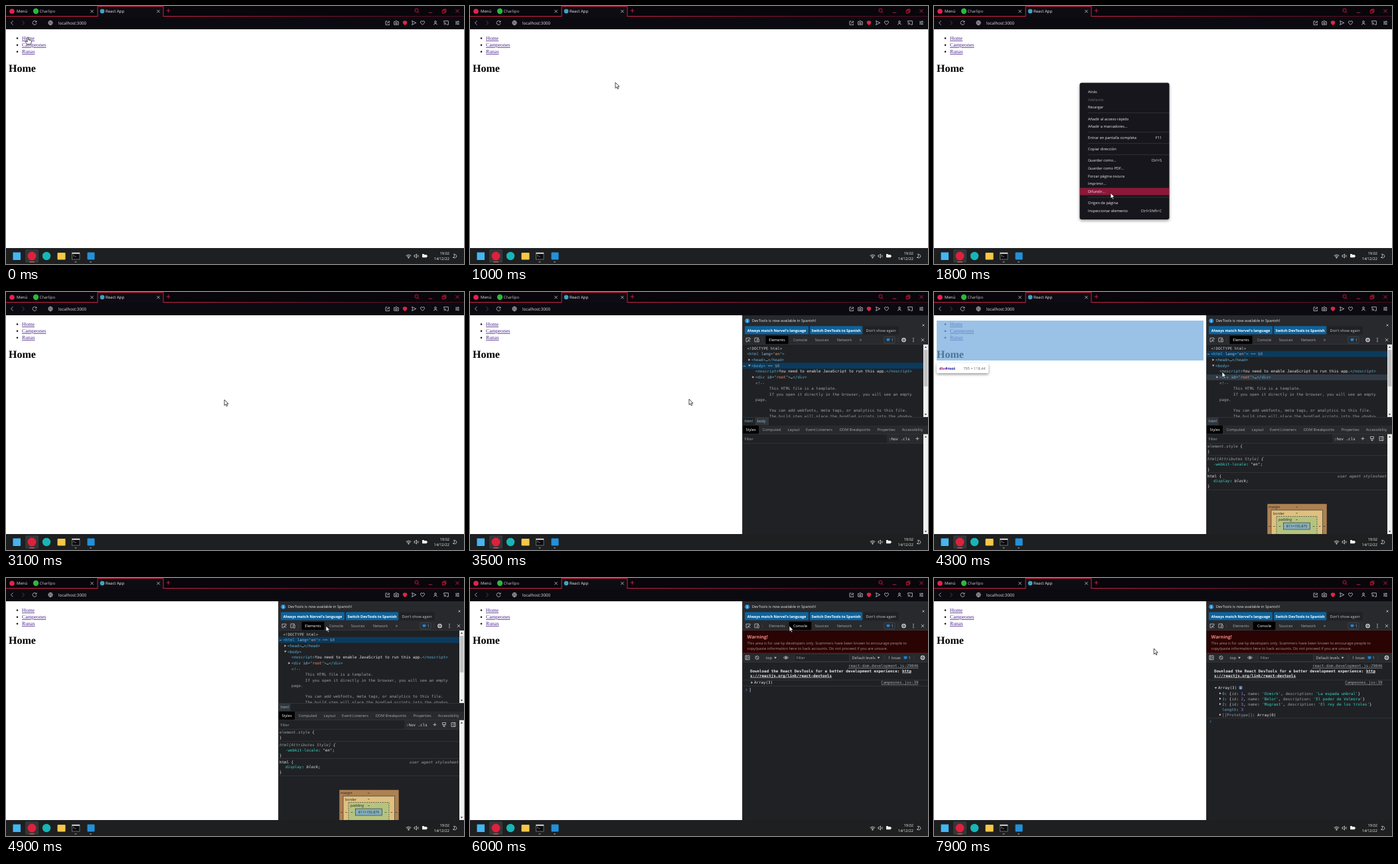
An HTML page that plays this animation: 690 px wide and 388 px high, repeating every 8 s.

```html
<!DOCTYPE html>
<html lang="es">
<head>
<meta charset="utf-8">
<title>React App</title>
<style>
  html, body { margin: 0; width: 100%; height: 100%; overflow: hidden; background: #fff; }
  svg { display: block; width: 690px; height: 388px; }
  text { white-space: pre; text-rendering: geometricPrecision; font-family: "Open Sans", "Noto Sans", sans-serif; }
  .mono { font-family: "DejaVu Sans Mono", "Liberation Mono", monospace; }
  .serif { font-family: "Liberation Serif", "Noto Serif", serif; }
  .b { font-weight: 700; }
  .i { font-style: italic; }
  .u { text-decoration: underline; }
</style>
</head>
<body>
<svg id="stage" viewBox="0 0 690 388"></svg>
<script>
const LOOP = 8000, STEP = 100;
const RED = '#e3244b', GREY = '#c9c9cf', DARK = '#202124', BAR = '#292a2d', LINE = '#3c3f42';
const INK = { w: '#e3e5e8', t: '#5db0d7', a: '#9bbbdc', v: '#f29766', g: '#9aa0a6', s: '#35d4c7', n: '#9980ff', p: '#c4c7ca' };

// Drawing helpers: each returns SVG markup.
const esc = s => s.replace(/&/g, '&amp;').replace(/</g, '&lt;');
const box = (x, y, w, h, fill, extra = '') => `<rect x="${x}" y="${y}" width="${w}" height="${h}" fill="${fill}" ${extra}/>`;
const dot = (x, y, r, fill) => `<circle cx="${x}" cy="${y}" r="${r}" fill="${fill}"/>`;
const text = (x, y, s, size = 5.65, fill = INK.w, cls = '', anchor = 'start') =>
  `<text x="${x}" y="${y}" font-size="${size}" fill="${fill}" class="${cls}" text-anchor="${anchor}">${esc(s)}</text>`;
const icon = (x, y, d, stroke = GREY, w = .8) =>
  `<path transform="translate(${x} ${y})" d="${d}" fill="none" stroke="${stroke}" stroke-width="${w}" stroke-linejoin="round"/>`;
const solid = (x, y, d, fill = GREY) => `<path transform="translate(${x} ${y})" d="${d}" fill="${fill}"/>`;
const group = (id, s) => `<g id="${id}">${s}</g>`;
const hline = (x, y, w, c = LINE) => box(x, y, w, .6, c);

// Monospaced line centred on y; "~k" switches to colour k.
function code(x, y, s, cls = '') {
  const parts = s.split(/~(\w)/);
  let spans = parts[0] ? `<tspan fill="${INK.w}">${esc(parts[0])}</tspan>` : '';
  for (let i = 1; i < parts.length; i += 2) spans += `<tspan fill="${INK[parts[i]]}">${esc(parts[i + 1])}</tspan>`;
  return `<text x="${x}" y="${y + 2}" font-size="5.85" class="mono ${cls}">${spans}</text>`;
}

const CROSS = 'M-2.2-2.2L2.2 2.2M2.2-2.2L-2.2 2.2';
const RIGHT = 'M-1-1.8L1.6 0L-1 1.8Z', DOWN = 'M-1.8-1H1.8L0 1.6Z', UP = 'M-1.8 1H1.8L0-1.6Z';
const RING = 'M-2.6 0a2.6 2.6 0 1 0 5.2 0a2.6 2.6 0 1 0-5.2 0';
const gear = (x, y) => icon(x, y, RING, GREY, 1.5) + dot(x, y, .9, GREY);

function chrome() {
  return box(0, 0, 690, 16, '#08060a') + box(0, 16, 690, 19, '#0c0a11')
    + box(0, 15, 138, .9, RED) + box(237, 15, 453, .9, 'url(#edge)')
    + box(138, .5, 99, 16, '#0e0c13') + icon(0, 0, 'M138 16V.5H237V16', RED, .9)
    + dot(9, 8, 3.8, RED) + text(16, 10.2, 'Menú', 6)
    + dot(45, 7.8, 4.2, '#2bb741') + text(50.5, 10.2, 'Charlipo', 6, '#c6c6cc') + icon(129.5, 8, CROSS)
    + dot(145, 7.8, 3.4, '#3fa3bd') + text(150, 10.2, 'React App', 6, '#f0f0f2') + icon(229.5, 8, CROSS)
    + icon(244.5, 7, 'M-2.8 0H2.8M0-2.8V2.8', RED)
    + icon(618.5, 6.5, RING + 'M2 2L4 4', RED) + icon(639.5, 10, 'M-2.8 0H2.8', RED)
    + icon(660, 7.5, 'M-2.8-1H1.4V3H-2.8ZM-1.2-1V-2.6H3V1.4H1.4', RED) + icon(680, 7.5, 'M-2.7-2.7L2.7 2.7M2.7-2.7L-2.7 2.7', RED)
    + icon(9, 25.3, 'M1.6-3L-1.6 0L1.6 3') + icon(26, 25.3, 'M-1.6-3L1.6 0L-1.6 3', '#55535c')
    + icon(43, 25.3, 'M2.6-1.6A3 3 0 1 0 3 .6M3-3.2V-1.2H1')
    + icon(67, 25.3, 'M-3.2 0a3.2 3.2 0 1 0 6.4 0a3.2 3.2 0 1 0-6.4 0M-3 0H3M0-3.2Q-3 0 0 3.2Q3 0 0-3.2')
    + text(79, 27.5, 'localhost:3000', 6.25, '#e6e6ea')
    + icon(575, 25.3, 'M-.5-2.5H-3V3H2.5V1M-1 1Q-1-1.5 3-1.5M1.3-3.2L3-1.5L1.3 0')
    + icon(588, 25.3, 'M-3.3-1.8H-1.5L-.8-3H.8L1.5-1.8H3.3V2.8H-3.3ZM-1.3.5a1.3 1.3 0 1 0 2.6 0a1.3 1.3 0 1 0-2.6 0')
    + solid(601, 25.3, 'M0-3.4L3.1-2.4V0Q3 2.4 0 3.6Q-3 2.4-3.1 0V-2.4Z', RED)
    + icon(614.5, 25.3, 'M-3-3L3.4 0L-3 3L-1.8 0Z')
    + icon(627.5, 25.3, 'M0 3L-2.8 0Q-3.8-2.4-1.6-2.8Q-.4-2.8 0-1.6Q.4-2.8 1.6-2.8Q3.8-2.4 2.8 0Z')
    + icon(647, 25.3, 'M-1.4-1.4a1.4 1.4 0 1 0 2.8 0a1.4 1.4 0 1 0-2.8 0M-2.4 3Q-2.2.8 0 .8T2.4 3')
    + icon(663, 25.3, 'M-3.4-1V-2.8H3.4V2.8H1M-3.4 2.8h.5M-3.4 1Q-1.7 1-1.6 2.8M-3.4-.6Q-.2-.6 0 2.8')
    + icon(680, 25.3, 'M-3-2H3M-3 0H3M-3 2H3M1-3V-1M-1.4-1V1M1 1V3', GREY, .7);
}

function page() {
  const links = ['Home', 'Campeones', 'Runas'].map((s, i) =>
    dot(17, 48.6 + i * 10.1, 1.25, '#111') + text(24, 51 + i * 10.1, s, 7.8, '#4b2489', 'serif u')).join('');
  return box(0, 35, 690, 329, '#fff') + links + text(4, 99, 'Home', 16, '#000', 'serif b');
}

function overlay() {
  return box(4, 43, 402, 60, '#6fa8dc', 'opacity=".7"')
    + box(4, 107, 78, 15, '#fff', 'rx="1.5" filter="url(#soft)"') + solid(14, 105.8, UP, '#fff')
    + text(8, 117, 'div', 5.6, '#881280', 'b') + text(16.8, 117, '#root', 5.6, '#1a1aa6', 'b')
    + text(77.5, 117, '795 × 118.44', 5.6, '#5f6368', '', 'end');
}

function taskbar() {
  const bars = [[35, 8, '#e2613c'], [103.5, 3, '#9a9a9a'], [126, 3, '#9a9a9a']];
  return box(0, 364, 690, 24, '#1d1f20') + box(10.5, 370.5, 11.5, 11.5, '#45b5f2')
    + box(29, 366, 20, 20, '#343638', 'rx="2"') + dot(39, 376, 6.4, '#e0203f') + dot(61, 376, 6.2, '#19b5b5')
    + box(77.5, 371, 12, 10.5, '#f7c748', 'rx="1"')
    + box(99.5, 371, 11.5, 10, '#0b0b0c', 'stroke="#8b8d8f" stroke-width=".7"') + box(99.5, 371, 11.5, 1.8, '#d5d7d9')
    + icon(102, 375.5, 'M-.8-1L.6 0L-.8 1M1.5 1.2H3.5', '#ddd', .6)
    + box(122.5, 370.5, 11, 11, '#2390d8', 'rx="1"')
    + bars.map(([x, w, c]) => box(x, 384.2, w, 1.4, c, 'rx=".7"')).join('')
    + icon(606.5, 378.5, 'M-3.8-3Q0-6 3.8-3M-2.4-1.4Q0-3.4 2.4-1.4', '#eee') + dot(606.5, 378.5, 1, '#eee')
    + icon(618.5, 376, 'M-3.5-1.2H-2L0-3V3L-2 1.2H-3.5ZM1.5-1.3Q2.3 0 1.5 1.3', '#eee', .7) + icon(618.5, 376, 'M2.7-2.2Q4.2 0 2.7 2.2', '#777', .7)
    + box(627, 374, 7, 4.2, '#eee', 'rx=".8"') + box(634.2, 375.2, .9, 1.8, '#eee') + solid(628, 375, 'M-1-2V1.5H0V3H1V1.5H2V-2Z', '#eee')
    + text(668, 374.3, '19:02', 5.7, '#f0f0f0', '', 'end') + text(668, 382.2, '14/12/22', 5.6, '#f0f0f0', '', 'end')
    + icon(676, 376, 'M-1.4-2.8Q3.2-2.6 2.8 1Q1.4 3.8-2.6 2.2Q1.2 1.2-1.4-2.8Z', '#eee', .7);
}

const ITEMS = [
  ['Atrás', 129], ['Adelante', 140.5], ['Recargar', 152], ['Añadir al acceso rápido', 169.5], ['Añadir a marcadores...', 181],
  ['Entrar en pantalla completa', 198, 'F11'], ['Copiar dirección', 215.3], ['Guardar como...', 232.3, 'Ctrl+S'],
  ['Guardar como PDF...', 244], ['Forzar página oscura', 255.7], ['Imprimir...', 267.3], ['Difundir...', 279],
  ['Origen de página', 296], ['Inspeccionar elemento', 307.7, 'Ctrl+Shift+C']
];

function menu() {
  return box(219.5, 115.5, 135, 205.5, '#15121d', 'rx="3" filter="url(#soft)"')
    + box(220, 0, 134, 11, '#8c1739', 'id="hot"')
    + [160.5, 189.5, 206.5, 223.5, 287.5].map(y => hline(232, y, 122, '#44414c')).join('')
    + ITEMS.map(([s, y, key]) => text(232, y + 2, s, 5.65, s === 'Adelante' ? '#6c6a72' : '#ececf0')
      + (key ? text(343, y + 2, key, 5.65, '#ececf0', '', 'end') : '')).join('');
}

const tab = (x, y, s, on, w) => (on ? box(x - w / 2, y - 6.2, w, 12.4, '#000') : '')
  + text(x, y + 2, s, 5.65, on ? '#fff' : '#a4a9ae', '', 'middle');
const badge = (x, y) => box(x - 2.4, y - 2.3, 4.8, 3.8, '#1a86d8', 'rx=".6"') + solid(x - 1, y + 1.5, 'M0 0H2L0 1.3Z', '#1a86d8');

function scrollbar(y, h, thumb) {
  return box(683, y, 7, h, '#f1f1f1') + solid(686.5, y + 4, UP, '#505050') + solid(686.5, y + h - 4, DOWN, '#505050')
    + (thumb ? box(683.8, y + 8, 5.4, thumb, '#c1c1c1') : '');
}

function devtools() {
  return box(410, 35, 280, 329, DARK) + box(410, 35, 280, 31, '#28292c') + box(410, 35, .7, 329, '#4a4c50')
    + dot(417.7, 43.3, 3.4, '#2b8fd9') + box(417.3, 42.7, .9, 2.6, '#fff') + box(417.3, 41.3, .9, .9, '#fff')
    + text(424.7, 45.3, 'DevTools is now available in Spanish!')
    + box(414, 51.3, 96, 12.2, '#0e639c', 'rx="1"') + text(462, 59.5, "Always match Norvel's language", 5.5, '#fff', 'b', 'middle')
    + box(512, 51.3, 79, 12.2, '#0e639c', 'rx="1"') + text(551.5, 59.5, 'Switch DevTools to Spanish', 5.5, '#fff', 'b', 'middle')
    + box(593, 51.3, 52.5, 12.2, '#202124', 'rx="1"') + text(619, 59.5, "Don't show again", 5.65, '#c4c7ca', '', 'middle')
    + icon(683, 50, 'M-1.5-1.5L1.5 1.5M1.5-1.5L-1.5 1.5')
    + box(410.7, 66, 279.3, 12.8, BAR) + hline(410.7, 78.4, 279.3)
    + icon(419, 72, 'M-.5 2.8H-3V-2.8H3V-.5M0 0L3.2 3.2M0 0V2.6M0 0H2.6') + icon(432, 72, 'M-3 2.8V-3H2.5V-1.5M-3 2.8H-.5M.5-1H3.2V3H.5Z')
    + icon(440.5, 72, 'M0-3.6V3.6', LINE)
    + tab(530, 72, 'Sources') + tab(564, 72, 'Network') + text(588.5, 74.2, '»', 7, '#a4a9ae', '', 'middle')
    + box(624, 67.4, 16, 9.4, 'none', 'rx="1.2" stroke="#55585c" stroke-width=".6"') + badge(630, 72) + text(634.5, 74, '1', 5.5, '#9fc9ee')
    + icon(645, 72, 'M0-3.6V3.6', LINE)
    + gear(653.5, 72) + [-2.5, 0, 2.5].map(d => dot(668, 72 + d, .8, GREY)).join('') + icon(682, 72, CROSS);
}

function elements() {
  const html = '~t<html ~alang~t="~ven~t">', body = '~t<body>', eq = '~g == $0';
  const row = (y, s) => box(411, y - 4.5, 272, 9, '#0b3a5c') + code(411.5, y - .8, '…') + s;
  const comment = [[145.3, 'This HTML file is a template.'], [154, 'If you open it directly in the browser, you will see an empty'],
    [178.3, 'You can add webfonts, meta tags, or analytics to this file.'], [187, 'The build step will place the bundled scripts into the <body>']];
  const tabs = [['Styles', 423], ['Computed', 454.5], ['Layout', 487.5], ['Event Listeners', 526], ['DOM Breakpoints', 580], ['Properties', 627], ['Accessibility', 666.5]];
  return tab(462.5, 72, 'Elements', true, 34) + tab(497.5, 72, 'Console')
    + code(417.5, 84.5, '~p<!DOCTYPE html>')
    + group('rowA', code(417.5, 93.2, html) + row(110.8, code(424, 110.8, body + eq)))
    + group('rowB', row(93.2, code(417.5, 93.2, html + eq)) + code(424, 110.8, body))
    + solid(420.5, 102, RIGHT) + code(424, 102, '~t<head>~w…~t</head>') + solid(420.8, 110.5, DOWN)
    + code(430, 119.4, '~t<noscript>~wYou need to enable JavaScript to run this app.~t</noscript>')
    + box(411, 124, 272, 8.6, '#5a7796', 'id="hover" opacity=".3"')
    + solid(426.5, 128, RIGHT) + code(430, 128.2, '~t<div ~aid~t="~vroot~t">~w…~t</div>')
    + code(430, 137, '~g<!--') + comment.map(([y, s]) => code(451, y, '~g' + s)).join('') + code(430, 162, '~gpage.')
    + scrollbar(79, 109, 55)
    + box(410.7, 188, 279.3, 13, DARK) + hline(410.7, 188, 279.3)
    + group('pathA', box(429.5, 189, 20.5, 11, '#33363a') + text(414, 196.3, 'html', 5.5, '#8fc7e6') + text(432.5, 196.3, 'body', 5.5, '#8fc7e6'))
    + group('pathB', box(411, 189, 17.5, 11, '#33363a') + text(414, 196.3, 'html', 5.5, '#8fc7e6'))
    + box(410.7, 200.8, 279.3, 12.6, BAR) + tabs.map(([s, x], i) => tab(x, 207.2, s, !i, 24)).join('')
    + hline(410.7, 213.4, 279.3) + text(413.5, 222.7, 'Filter', 5.65, '#9aa0a6') + hline(410.7, 227, 272.3)
    + group('toolsA', box(628, 214, 55, 13, BAR) + code(631, 220.5, ':hov .cls') + icon(674, 220.5, 'M-2.5 0H2.5M0-2.5V2.5'))
    + group('styles', styles())
    + scrollbar(213.8, 150.2);
}

function styles() {
  const cell = (x, y, w, h, fill, dash) => box(x, y, w, h, fill, `stroke="#222" stroke-width=".6" ${dash ? 'stroke-dasharray="2 1.4"' : ''}`);
  const dashes = [[546.5, 323], [546.5, 332.5], [546.5, 342], [505.5, 352], [512.5, 352], [521, 352], [572, 352], [581, 352], [588, 352]];
  return box(600, 214, 83, 13, BAR) + code(603, 220.5, ':hov .cls') + icon(646, 220.5, 'M-2.5 0H2.5M0-2.5V2.5')
    + icon(660, 220.5, 'M-2.5-3H2.5V0H-2.5ZM-1 0V3H1V0') + icon(674, 220.5, 'M-3-3H3V3H-3ZM1-3V3M-1-1L-2 0L-1 1')
    + code(412, 232, '~gelement.style ~w{') + code(412, 240.3, '}') + hline(411, 245.5, 272)
    + code(412, 250.8, '~ghtml[Attributes Style] ~w{', 'i') + code(421, 258.8, '~s-webkit-locale~w: "en";') + code(412, 266.5, '}') + hline(411, 271, 272)
    + code(412, 276.5, 'html {') + text(682, 278.5, 'user agent stylesheet', 5.85, INK.g, 'mono i', 'end')
    + code(421, 284.3, '~sdisplay~w: block;', 'i') + code(412, 292, '}') + hline(411, 297, 272)
    + cell(502, 318.3, 90, 70, '#ae8152') + cell(508, 328, 77.5, 52, '#e0c080') + cell(516, 337.5, 61, 34, '#b5c380', true)
    + cell(526.5, 347, 40, 10, '#86b0bd')
    + text(504, 325.2, 'margin', 5.3, '#222') + text(511, 334.7, 'border', 5.3, '#222') + text(519, 344.2, 'padding', 5.3, '#222')
    + text(546.5, 354, '811×155.875', 5.3, '#222', '', 'middle')
    + dashes.map(([x, y]) => box(x - 1.3, y, 2.6, .6, '#222')).join('');
}

function consoleView() {
  const entry = (i, name, desc) => solid(431, 173.5 + i * 8, RIGHT)
    + code(434.3, 173.5 + i * 8, `~t${i}~w: {~gid~w: ~n${i + 1}~w, ~gname~w: ~s'${name}'~w, ~gdescription~w: ~s'${desc}'~w}`);
  const link = (y, s) => text(675.5, y + 2, s, 5.85, '#a4a9ae', 'mono u', 'end');
  return box(410.7, 79, 279.3, 285, DARK) + tab(462.5, 72, 'Elements') + tab(497.5, 72, 'Console', true, 33.5)
    + box(410.7, 79, 279.3, 33.5, '#2a0303') + hline(410.7, 112.3, 279.3, '#5c1010')
    + text(417.5, 90.8, 'Warning!', 7, '#f08a84', 'b')
    + text(417.5, 99.7, 'This area is for use by developers only. Scammers have been known to encourage people to', 5.65, '#a89492')
    + text(417.5, 107.6, 'copy/paste information here to hack accounts. Do not proceed if you are unsure.', 5.65, '#a89492')
    + box(410.7, 113, 279.3, 13.4, BAR) + hline(410.7, 126.2, 279.3)
    + icon(418, 119.8, 'M-3-3H3V3H-3ZM-1-3V3M.5-1.4L2 0L.5 1.4') + icon(432.5, 119.8, RING + 'M-1.8-1.8L1.8 1.8')
    + text(446, 121.8, 'top', 5.65, INK.p) + solid(460, 119.8, DOWN)
    + icon(476, 119.8, 'M-3.6 0Q0-4 3.6 0Q0 4-3.6 0Z') + dot(476, 119.8, 1.3, GREY)
    + box(489, 114.3, 82.5, 10.8, DARK, `stroke="${LINE}" stroke-width=".5"`) + text(491.5, 121.8, 'Filter', 5.65, '#9aa0a6')
    + text(575.5, 121.8, 'Default levels', 5.65, INK.p) + solid(615.5, 119.8, DOWN)
    + icon(624, 119.8, 'M0-4V4M45 -4V4', LINE) + text(630, 121.8, '1 Issue:', 5.65, INK.p) + badge(656, 120) + text(660.5, 121.8, '1', 5.5, '#9fc9ee') + gear(682, 119.8)
    + link(132.2, 'react-dom.development.js:29846')
    + code(422, 139.6, 'Download the React DevTools for a better development experience: ', 'b')
    + text(651, 141.6, 'http', 5.85, INK.w, 'mono b u') + text(422, 148.6, 's://reactjs.org/link/react-devtools', 5.85, INK.w, 'mono b u')
    + hline(411, 153, 279) + link(157.2, 'Campeones.jsx:39')
    + group('closed', solid(424.5, 157.3, RIGHT) + code(428, 157.3, 'Array(3)') + hline(411, 162.3, 279)
      + icon(416.5, 168.3, 'M-1-1.7L1 0L-1 1.7', '#3b8eea') + box(421.8, 165.2, .6, 6.6, '#e8eaed'))
    + group('open', solid(424.5, 165.2, DOWN) + code(428, 165.2, 'Array(3)') + box(459.5, 162.6, 5, 5, '#5577c0', 'rx="1"') + text(462, 167, 'i', 4.6, '#fff', 'b', 'middle')
      + entry(0, 'Ozmirk', 'La espada umbral') + entry(1, 'Belor', 'El poder de Velmora') + entry(2, 'Mograst', 'El rey de los troles')
      + code(434.3, 197.6, '~tlength~w: ~n3') + solid(431, 205.6, RIGHT) + code(434.3, 205.6, '~g[[Prototype]]~w: Array(0)')
      + hline(411, 210.6, 279) + icon(416.5, 215.7, 'M-1-1.7L1 0L-1 1.7', '#3b8eea'));
}

const stage = document.getElementById('stage');
stage.innerHTML = `<defs>
  <linearGradient id="edge" gradientUnits="userSpaceOnUse" x1="237" y1="0" x2="690" y2="0"><stop offset="0" stop-color="${RED}"/><stop offset=".5" stop-color="#8a1530"/><stop offset="1" stop-color="#4a1020"/></linearGradient>
  <filter id="soft" x="-20%" y="-20%" width="140%" height="150%"><feDropShadow dx="0" dy="2" stdDeviation="2.2" flood-color="#000" flood-opacity=".4"/></filter>
  </defs>`
  + page() + group('overlay', overlay()) + group('dev', devtools() + group('elements', elements()) + group('console', consoleView()))
  + chrome() + taskbar() + group('menu', menu())
  + '<g id="cursor" stroke="#111" stroke-width=".75" fill="#fff" stroke-linejoin="round">'
  + '<path id="arrow" d="M0 0V8.6L2 6.8L3.3 9.8L4.7 9.2L3.4 6.2H6Z"/>'
  + '<path id="hand" d="M-1 1Q0-.6 1 1V4.4L4.6 5.2Q5.6 5.6 5.4 7.2L4.6 11H-1.4L-4 7.2Q-3.6 5.6-2.4 6.4L-1 7.6Z"/></g>';

// Pointer track: time, x, y.
const TRACK = [
  [0, 33, 46.5], [400, 40, 49], [500, 40, 49], [600, 92, 70], [700, 180, 104], [800, 219, 115], [1500, 219, 115],
  [1600, 236, 180], [1700, 258, 250], [1800, 266, 281], [2100, 262, 302], [2200, 262, 302], [2400, 261, 303], [2800, 261, 303],
  [2900, 280, 262], [3000, 316, 190], [3100, 329, 162], [3200, 330, 161], [3500, 330, 161], [3600, 400, 176], [3700, 473, 183],
  [3900, 423, 110], [4000, 423, 110], [4300, 434, 120], [4600, 436, 118], [4800, 474, 78], [4900, 482, 72], [5000, 481, 72],
  [6100, 481, 72], [6300, 480, 112], [6600, 454, 153], [6800, 450, 157], [7200, 450, 157], [7500, 388, 130], [7700, 337, 108],
  [7800, 332, 106], [7900, 331.3, 106]
];

function pointer(t) {
  const i = TRACK.findIndex(k => k[0] > t);
  if (i < 0) return TRACK[TRACK.length - 1].slice(1);
  const [t0, x0, y0] = TRACK[i - 1], [t1, x1, y1] = TRACK[i], f = (t - t0) / (t1 - t0);
  return [x0 + (x1 - x0) * f, y0 + (y1 - y0) * f];
}

const el = id => document.getElementById(id);
const show = (id, on) => { el(id).style.display = on ? '' : 'none'; };

function draw(t) {
  const [x, y] = pointer(t), picked = t >= 3600;
  el('cursor').setAttribute('transform', `translate(${x} ${y})`);
  show('hand', t < 600);
  show('arrow', t >= 600);

  show('menu', t >= 1300 && t < 2700);
  el('menu').style.opacity = t < 1400 ? .6 : 1;
  const item = ITEMS.find(r => Math.abs(r[1] - y) < 5.8);
  show('hot', item);
  if (item) el('hot').setAttribute('y', item[1] - 5.5);

  show('dev', t >= 3300);
  for (const id of ['rowA', 'pathA', 'toolsA']) show(id, !picked);
  for (const id of ['rowB', 'pathB', 'styles']) show(id, picked);
  const over = t >= 4100 && t < 4700;
  show('overlay', over);
  show('hover', over);
  show('elements', t < 5500);
  show('console', t >= 5500);
  show('closed', t < 7000);
  show('open', t >= 7000);
}

const start = performance.now();
function tick() {
  const t = (performance.now() - start) % LOOP;
  draw(Math.floor(t / STEP) * STEP);
  requestAnimationFrame(tick);
}
tick();
</script>
</body>
</html>
```
